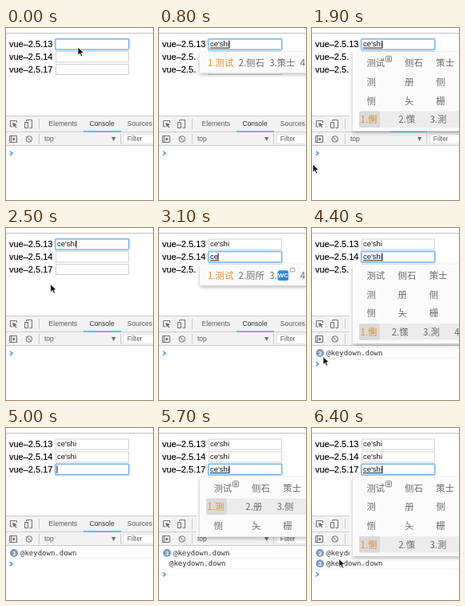
An HTML page that plays this animation: 184x216 px, repeating every 6.5 s.

```html
<!DOCTYPE html>
<html lang="zh">
<head>
<meta charset="utf-8">
<title>IME keydown demo</title>
<style>
html, body { margin: 0; width: 100%; height: 100%; overflow: hidden; background: #fff; }
svg { display: block; width: 184px; height: 216px; }
text { white-space: pre; }
.label { font: 11px "Liberation Sans", sans-serif; fill: #000; stroke: #000; stroke-width: .15; }
.value { font: 9.5px "Liberation Sans", sans-serif; fill: #111; }
.ui { font: 8.5px "Liberation Sans", sans-serif; fill: #5a5a5a; }
.ui .active { fill: #333; }
.log { font: 9px "DejaVu Sans Mono", monospace; fill: #333; }
.count { font: bold 8px "Liberation Sans", sans-serif; fill: #fff; text-anchor: middle; }
.ime { font: 11.4px "Noto Sans CJK SC", "Noto Sans CJK", sans-serif; fill: #6c6c6c; }
.ime .on { fill: #e2912f; }
.icon { fill: none; stroke: #6e6e6e; }
</style>
</head>
<body>
<svg viewBox="0 0 184 216">
  <defs>
    <filter id="soft" x="-20%" y="-30%" width="140%" height="160%">
      <feGaussianBlur stdDeviation="2.6"/>
    </filter>
  </defs>
  <rect width="184" height="216" fill="#fff"/>
  <path d="M0 6.5H184" stroke="#c4c4c4"/>
  <g id="fields"></g>

  <rect y="110" width="184" height="38" fill="#f3f3f3"/>
  <path d="M0 110.5H184M0 130.5H184M0 147.5H184" stroke="#ccc"/>
  <path d="M41.5 114V127M41.5 133V146M143.5 133V146" stroke="#ccc"/>
  <path d="M97 130H144" stroke="#3fb0d8" stroke-width="1.6"/>
  <g class="icon">
    <path d="M8 124H5.5V116.5H13.5V119"/>
    <path d="M8.5 118.5L14 121.5L11.8 122.3L13.5 125L12.3 125.6L10.8 123L9 124.5Z" fill="#6e6e6e" stroke="none"/>
    <path d="M25.5 117V115.5H32.5V125.5H29.5M23.5 118.5H27.5V125.5H23.5Z"/>
    <path d="M4.5 135.5H13.5V143.5H4.5ZM6.5 135.5V143.5"/>
    <path d="M8.5 137.3L12 139.5L8.5 141.7Z" fill="#6e6e6e" stroke="none"/>
    <circle cx="28.8" cy="139.5" r="3.8"/><path d="M26.2 136.8L31.4 142.2"/>
  </g>
  <g class="ui">
    <text x="53.6" y="123">Elements</text>
    <text x="104.5" y="123" class="active">Console</text>
    <text x="151.8" y="123">Sources</text>
    <text x="48" y="142">top</text>
    <path d="M132 137H137.4L134.7 142Z" fill="#6e6e6e"/>
    <rect x="147.5" y="133.5" width="40" height="12" fill="#fff" stroke="#e4e4e4"/>
    <text x="151.8" y="142.3">Filter</text>
  </g>

  <g id="logs"></g>
  <path id="prompt" d="M5 -2.6L8 0L5 2.6" fill="none" stroke="#3d8fdb" stroke-width="1.4"/>
  <g id="panel"></g>
  <path id="arrow" d="M0 0V10.2L2.4 8L4.1 11.8L5.9 11L4.2 7.3H7.4Z" fill="#111" stroke="#fff" stroke-width=".8"/>
  <path id="beam" d="M-2 -5Q0 -5 0 -3.8Q0 -5 2 -5M0 -4V4M-2 5Q0 5 0 3.8Q0 5 2 5" fill="none" stroke="#222"/>
</svg>
<script>
const LOOP = 6500, TICK = 100;
const $ = id => document.getElementById(id);
const rowY = i => 20.3 + i * 15.75;
const GRID = ['测试 侧石 策士', '测 册 侧', '恻 夨 栅', '惻 憡 測'].map(r => r.split(' '));
const WORDS = {
  c: ['从', '才', '出'],
  ce: ['测试', '厕所', 'WC'],
  "ce's": ['测试', '厕所', '策士'],
  "ce'sh": ['测试', '侧石', '策士'],
  "ce'shi": ['测试', '侧石', '策士']
};

// One session per field: focus, typed text, arrow-down presses, commit
const SESSIONS = [
  { focus: 0, keys: [[400, 'c'], [500, 'ce'], [600, "ce's"], [700, "ce'sh"], [800, "ce'shi"]],
    downs: [1000, 1200, 1400], commit: 2300, badge: true, logs: false },
  { focus: 2700, keys: [[3000, 'c'], [3100, 'ce'], [3200, "ce's"], [3300, "ce'shi"]],
    downs: [3500, 3700, 3900], commit: 4500, badge: false, logs: true },
  { focus: 4900, keys: [[5100, 'c'], [5200, 'ce'], [5300, "ce's"], [5400, "ce'shi"]],
    downs: [5600, 5800, 6000], commit: LOOP, badge: true, logs: true }
];

// Pointer: time, x, y, shape; a null shape hides it
const POINTER = [
  [0, 90, 24, 'arrow'], [100, 90, 25, 'beam'], [400, 90, 25, null],
  [1600, 62, 66, 'arrow'], [1900, 1, 171, 'arrow'], [2200, 4, 168, 'arrow'],
  [2600, 73, 38, 'beam'], [3000, 73, 38, null],
  [3800, 72, 43, 'beam'], [3900, 73, 45, 'beam'], [4000, 62, 64, 'arrow'], [4300, 12, 162, 'arrow'],
  [4500, 16, 161, 'arrow'], [4800, 64, 52, 'beam'], [4900, 64, 52, null],
  [6100, 70, 60, 'beam'], [6200, 58, 120, 'arrow'], [6300, 40, 185, 'arrow'], [6400, 33.7, 164.3, 'arrow']
];

const text = (cls, x, y, s) => `<text class="${cls}" x="${x}" y="${y}">${s}</text>`;
const rect = (x, y, w, h, attrs) => `<rect x="${x}" y="${y}" width="${w}" height="${h}" ${attrs}/>`;
const typed = (s, t) => (s.keys.filter(k => k[0] <= t).pop() || [0, ''])[1];
const presses = (s, t) => s.downs.filter(d => d <= t).length;

function drawFields(t) {
  const active = SESSIONS.filter(s => s.focus <= t).length - 1;
  $('fields').innerHTML = SESSIONS.map((s, i) => {
    const y = rowY(i);
    return text('label', 4, y + 3.7, 'vue–2.5.1' + [3, 4, 7][i])
      + (i === active
        ? rect(61.5, y - 6.8, 92.5, 14, 'rx="1.5" fill="#fff" stroke="#b4d5f6" stroke-width="2"')
          + rect(62, y - 6.3, 91.5, 13, 'rx="1" fill="none" stroke="#78b1ec"')
        : rect(62.5, y - 6.3, 91, 13, 'fill="#fff" stroke="#d2d2d2"'))
      + `<text class="value" id="v${i}" x="64" y="${y + 3}">${typed(s, t)}</text>`;
  }).join('');
  SESSIONS.forEach((s, i) => {
    const word = typed(s, t), y = rowY(i);
    const end = 64 + (word ? $('v' + i).getComputedTextLength() : 0);
    let d = '';
    if (word && t < s.commit) d += `<path d="M64 ${y + 4.7}H${end}" stroke="#222"/>`;
    if (i === active && t >= 100) d += `<path d="M${end} ${y - 4.5}v9.5" stroke="#111"/>`;
    $('fields').insertAdjacentHTML('beforeend', d);
  });
}

function drawLogs(t) {
  const counts = SESSIONS.filter(s => s.logs).map(s => presses(s, t)).filter(Boolean);
  $('logs').innerHTML = counts.map((n, i) => {
    const y = 157 + i * 13.3;
    return `<path d="M0 ${y + 6.8}H184" stroke="#f0f0f0"/>`
      + (n > 1 ? `<circle cx="10" cy="${y}" r="5" fill="#7d97c6"/>` + text('count', 10, y + 2.9, n) : '')
      + text('log', n > 1 ? 18 : 13, y + 3, '@keydown.down');
  }).join('');
  $('prompt').setAttribute('transform', `translate(0 ${157.3 + counts.length * 13.3})`);
}

const badge = (x, y) => rect(x, y, 7, 7, 'rx="1" fill="#fff" stroke="#777" stroke-width=".9"')
  + `<path d="M${x + 1.5} ${y + 2}h4m-4 1.6h4m-4 1.6h4" stroke="#666" stroke-width=".8"/>`;

const emoji = (x, y) => rect(x, y - 6.3, 13.5, 12.8, 'rx="2.5" fill="#2f86dc"')
  + text('count', x + 6.8, y + 2.8, 'WC')
  + rect(x + 15.5, y - 9, 6, 4.5, 'rx="1" fill="#fff" stroke="#888" stroke-width=".8"');

function compact(word, y) {
  let next = 61;
  return [...WORDS[word], ''].map((w, i) => {
    const x = next, pic = w === 'WC';
    next += w.length > 1 ? 38.6 : 27;
    return text(i ? '' : 'on', x, y + 4.3, `${i + 1}.${pic ? '' : w}`) + (pic ? emoji(x + 10.3, y) : '');
  }).join('');
}

function grid(s, row, y) {
  const shift = s.badge ? 8.5 : 0, bar = y + row * 23.8 - 10.5;
  let out = rect(59, bar, 130, 20.5, 'rx="2" fill="#ececec"')
    + rect(59, bar, 26, 20.5, 'rx="2" fill="#dadada"');
  GRID.forEach((words, r) => words.concat(r === row ? '' : []).forEach((w, c) => {
    const x = 60.6 + c * 39.2 + (c ? shift : 0), on = r === row;
    out += text(on && !c ? 'on' : '', on ? x : x + 7.8, y + r * 23.8 + 4.3,
      (on ? c + 1 + (w && '.') : '') + w);
  }));
  return out + (s.badge ? badge(92.5, y - 8.4) : '');
}

function drawPanel(t) {
  const i = SESSIONS.findIndex(s => typed(s, t) && t < s.commit);
  if (i < 0) return void ($('panel').innerHTML = '');
  const s = SESSIONS[i], n = presses(s, t), top = rowY(i) + 9.7, y = rowY(i) + 23.4;
  const grow = n ? Math.min(1, (t - s.downs[0] + TICK) / 300) : 0;
  const h = 26.5 + 73 * grow;
  $('panel').innerHTML = rect(47, top, 150, h, 'fill="#fff"')
    + rect(51, top + 2, 150, h, 'fill="#000" opacity=".28" filter="url(#soft)"')
    + rect(51, top, 150, h, 'fill="#fbfbfb"')
    + `<clipPath id="cut">${rect(51, top - 2, 150, h + 2, '')}</clipPath>`
    + `<g class="ime" clip-path="url(#cut)">${n ? grid(s, n, y) : compact(typed(s, t), y)}</g>`;
}

function drawPointer(t) {
  const k = POINTER.findLastIndex(p => p[0] <= t);
  const a = POINTER[k], b = POINTER[k + 1] || a;
  const f = b[3] && b !== a ? (t - a[0]) / (b[0] - a[0]) : 0;
  const at = `translate(${a[1] + (b[1] - a[1]) * f} ${a[2] + (b[2] - a[2]) * f})`;
  for (const id of ['arrow', 'beam']) {
    $(id).setAttribute('visibility', a[3] === id ? 'visible' : 'hidden');
    $(id).setAttribute('transform', at);
  }
}

let last = -1;
const start = performance.now();
function frame() {
  const now = (performance.now() - start) % LOOP, t = now - now % TICK;
  if (t !== last) {
    last = t;
    [drawFields, drawLogs, drawPanel, drawPointer].forEach(draw => draw(t));
  }
  requestAnimationFrame(frame);
}
frame();
</script>
</body>
</html>
```
